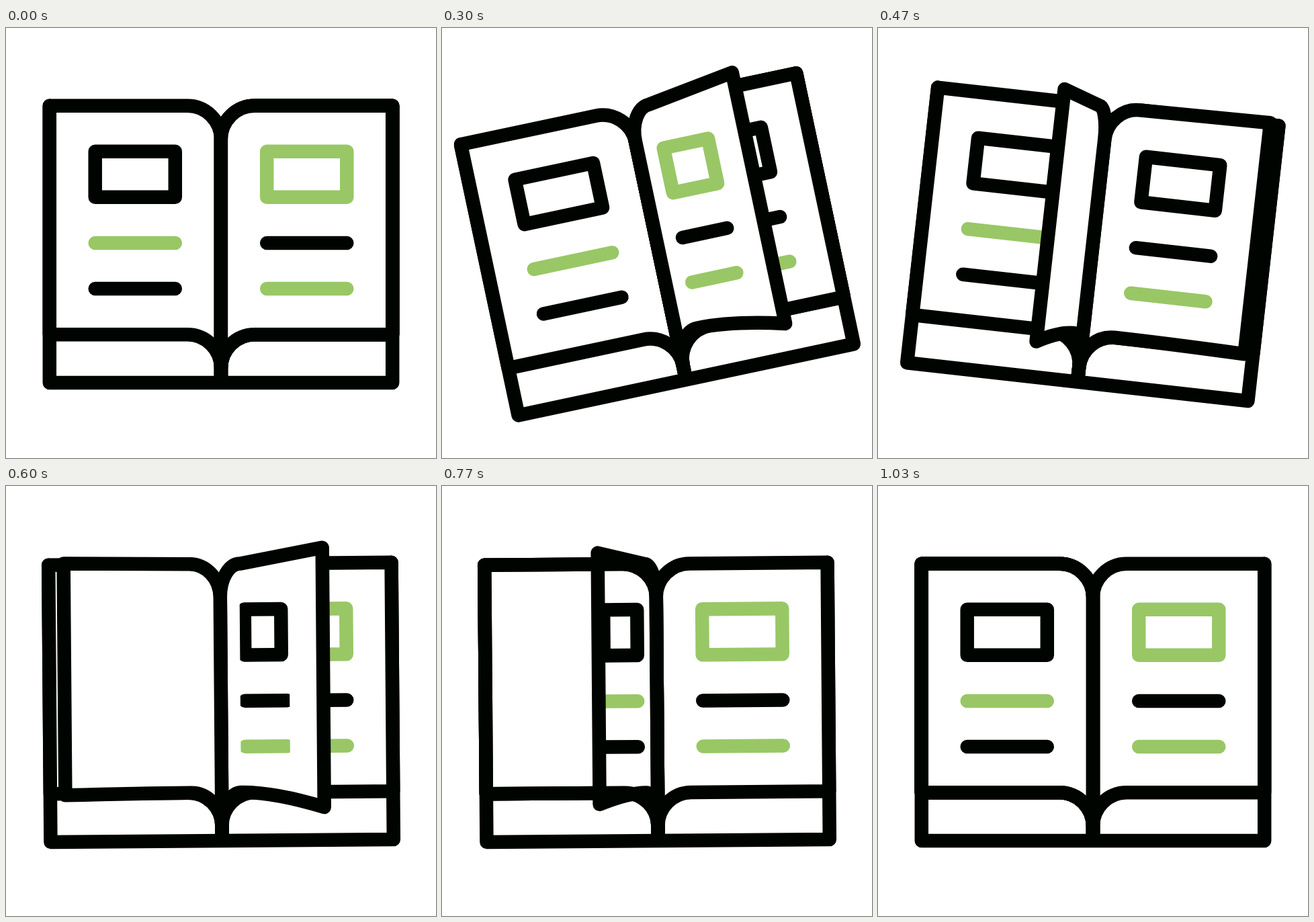
These frames come from a looping animation (640x640 px, 1.67 s). An HTML page with a canvas:

```html
<!DOCTYPE html>
<html lang="en">
<head>
<meta charset="utf-8">
<title>Book</title>
<style>
  html, body { margin: 0; width: 100%; height: 100%; overflow: hidden; background: #fff; }
  canvas { display: block; }
</style>
</head>
<body>
<canvas id="stage" width="640" height="640"></canvas>
<script>
const ctx = document.getElementById('stage').getContext('2d');
const LOOP = 1670, STEP = 100 / 3;
const BLACK = '#000400', GREEN = '#99c766', WHITE = '#fff';

// All coordinates are relative to the stage centre, which is also the pivot.
const HALF = 255.2, TOP = -204.2, FOLD = 136.3, BASE = 208;
const SPINE_END = 204, R = 50, NEAR = 68.2, FAR = 187.3;

// Key tables: [step, value]
const TILT = [[0, 0], [5, -8.2], [8.2, -12.4], [9, -12], [14, 6.4], [14.8, 6.7],
  [16, 5.2], [18, -0.45], [23, -0.45], [31, 0]];
const TURN = [[4, 1], [5, 0.982], [5.4, 0.95], [9, 0.635], [10, 0.53],
  [14, -0.265], [18, -0.912], [21.5, -1]];
const SECOND_DELAY = 8.6;

// Colours of the box and the two lines on each printed side
const PRINT_LEFT = [BLACK, GREEN, BLACK];
const PRINT_RIGHT = [GREEN, BLACK, GREEN];
const PRINT_MIDDLE = [BLACK, BLACK, GREEN];

// Smooth curve through the keys that never overshoots them
function curve(keys, x) {
  const last = keys.length - 1;
  if (x <= keys[0][0]) return keys[0][1];
  if (x >= keys[last][0]) return keys[last][1];
  const rise = i => (keys[i + 1][1] - keys[i][1]) / (keys[i + 1][0] - keys[i][0]);
  const slope = i => {
    if (i === 0 || i === last) return 0;
    const a = rise(i - 1), b = rise(i);
    return a * b > 0 ? 2 * a * b / (a + b) : 0;
  };
  let i = 0;
  while (x > keys[i + 1][0]) i++;
  const h = keys[i + 1][0] - keys[i][0], u = (x - keys[i][0]) / h, v = 1 - u;
  return v * v * (1 + 2 * u) * keys[i][1] + u * u * (3 - 2 * u) * keys[i + 1][1]
    + h * u * v * (v * slope(i) - u * slope(i + 1));
}

// How far the free edge of a turning page grows toward the viewer
function liftOf(s) {
  if (s > 0.3) return 57 * (1 - s);
  if (s > 0) return 25.5 + 48 * s;
  return 25.5 * (1 + s);
}

// s runs from 1 (flat on the right) to -1 (flat on the left)
function pagePath(s) {
  const r = R * s, edge = HALF * s, lift = liftOf(s), k = 0.4477;
  const path = new Path2D();
  path.moveTo(0, SPINE_END);
  path.lineTo(0, TOP + R);
  path.bezierCurveTo(0, TOP + R * k, r * k, TOP, r, TOP);
  path.lineTo(edge, TOP - lift);
  path.lineTo(edge, FOLD + lift);
  path.quadraticCurveTo(r + (edge - r) * 0.4, FOLD, r, FOLD);
  path.bezierCurveTo(r * k, FOLD, 0, FOLD + R * k, 0, FOLD + R);
  return path;
}

function ink(path, color) {
  ctx.strokeStyle = color;
  ctx.stroke(path);
}

function drawPrint(colors, side, scale, trim) {
  const a = side * NEAR * scale, b = side * FAR * scale;
  const box = new Path2D();
  box.rect(a, -136.2, b - a - trim, 68);
  ink(box, colors[0]);
  [0, 68].forEach((y, i) => {
    const line = new Path2D();
    line.moveTo(a, y);
    line.lineTo(b, y);
    ink(line, colors[i + 1]);
  });
}

function clipX(a, b) {
  ctx.beginPath();
  ctx.rect(Math.min(a, b), -320, Math.abs(b - a), 640);
  ctx.clip();
}

function drawPage(s, front, back, tight) {
  const path = pagePath(s), colors = s > 0 ? front : back;
  const side = s > 0 ? 1 : -1, shrink = 1 - Math.abs(s);
  ctx.fillStyle = WHITE;
  ctx.fill(path);
  if (colors) {
    const scale = Math.max(0.05, 1 - (s > 0 ? 1.18 : 0.877) * shrink);
    const narrow = tight && s > 0;
    ctx.save();
    clipX(0, HALF * s);
    if (narrow && shrink > 0.06) clipX(55 * scale, FAR * scale + Math.max(0, 17 * scale - 5));
    drawPrint(colors, side, scale, narrow ? 20 * shrink : 0);
    ctx.restore();
  }
  ink(path, BLACK);
}

function drawCover() {
  const path = new Path2D();
  path.moveTo(-HALF, TOP);
  path.lineTo(-HALF, BASE);
  path.lineTo(HALF, BASE);
  path.lineTo(HALF, TOP);
  ink(path, BLACK);
}

function draw(step) {
  const first = curve(TURN, step), second = curve(TURN, step - SECOND_DELAY);
  ctx.setTransform(1, 0, 0, 1, 0, 0);
  ctx.fillStyle = WHITE;
  ctx.fillRect(0, 0, 640, 640);
  ctx.translate(320, 320);
  ctx.rotate(curve(TILT, step) * Math.PI / 180);
  ctx.lineWidth = 20.5;
  ctx.lineCap = ctx.lineJoin = 'round';

  drawCover();
  drawPage(-1, null, PRINT_LEFT);
  drawPage(1, PRINT_RIGHT, null);
  if (second > 0) {
    drawPage(second, PRINT_MIDDLE, PRINT_LEFT, true);
    drawPage(first, PRINT_RIGHT, null);
  } else {
    drawPage(first, PRINT_RIGHT, null);
    drawPage(second, PRINT_MIDDLE, PRINT_LEFT, true);
    // the page below shows its outline through the one landing on it
    ink(pagePath(first), BLACK);
  }
}

const start = performance.now();
function tick() {
  const time = (performance.now() - start) % LOOP;
  draw(Math.floor((time + 5) / STEP) % 50);
  requestAnimationFrame(tick);
}
tick();
</script>
</body>
</html>
```
